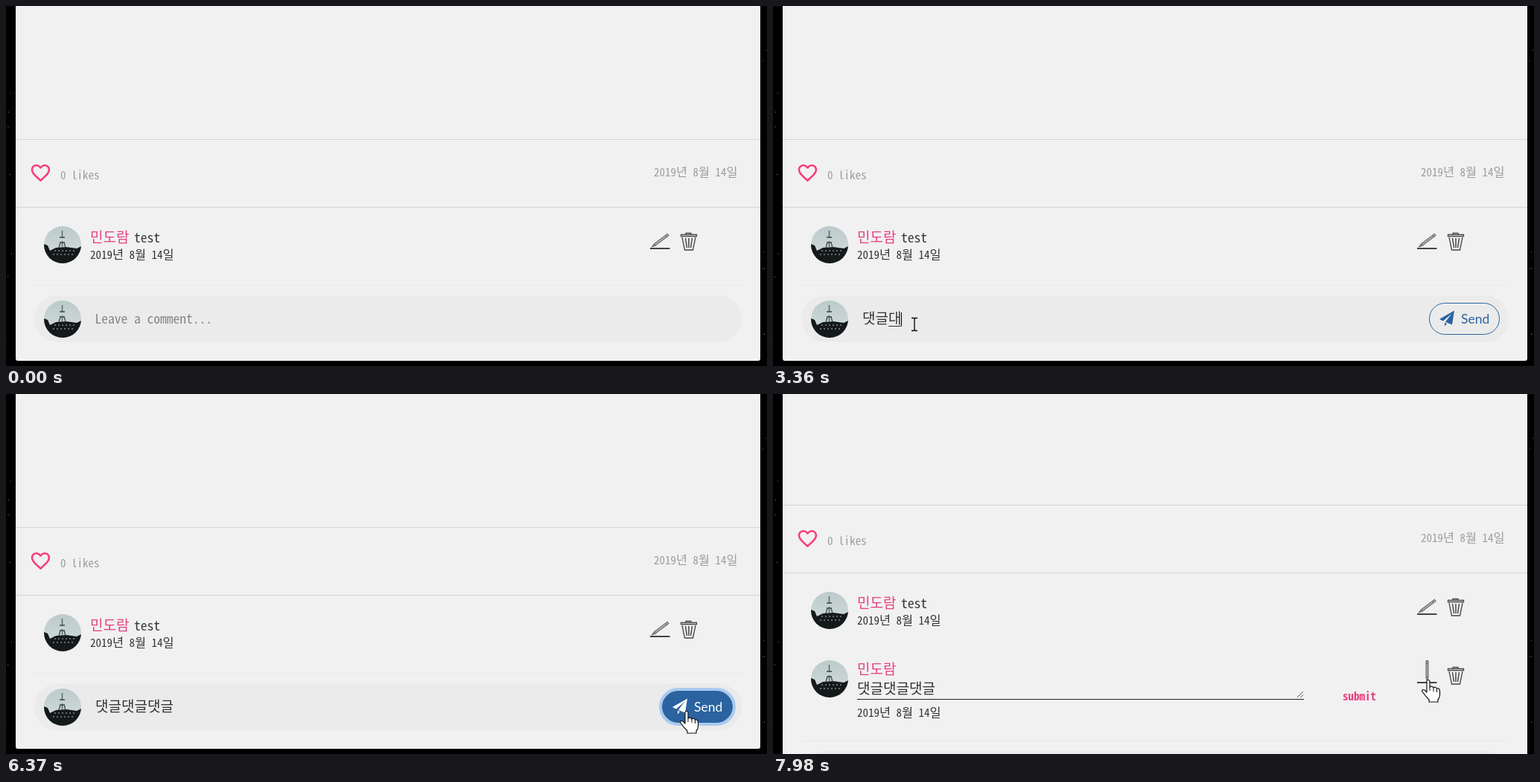
An HTML page for the animation above (8 s loop, 1022 by 484 pixels).

```html
<!DOCTYPE html>
<html lang="ko">
<head>
<meta charset="utf-8">
<title>Comments</title>
<style>
html, body { margin: 0; width: 100%; height: 100%; overflow: hidden; background: #000; }
svg { display: block; }
text { font: 17.5px "Noto Sans Mono CJK KR", "Noto Sans CJK KR", monospace; fill: #333; white-space: pre; }
text.small { font-size: 15px; }
text.gray { fill: #9c9c9c; }
text.hint { fill: #858585; }
text.pink { fill: #e6417f; font-weight: 700; }
/* Hangul is .92em wide, so it is set larger to fill two Latin cells. */
.han { font: 300 19px "Noto Sans CJK KR", "Noto Sans Mono CJK KR", sans-serif; }
.han.small { font-size: 16.3px; }
text.pink.han { font-weight: 500; }
#send text { font: 17.5px Lato, "Open Sans", sans-serif; }
.cursor path { stroke-linejoin: round; }
</style>
</head>
<body>
<svg width="1022" height="484" viewBox="0 0 1022 484">
  <defs>
    <clipPath id="round"><circle cx="25" cy="25" r="25"/></clipPath>
    <clipPath id="pillClip"><rect x="38" y="389" width="950" height="63" rx="31.5"/></clipPath>
    <linearGradient id="sky" x2="0" y2="1">
      <stop stop-color="#bccacb"/><stop offset="1" stop-color="#d6dedd"/>
    </linearGradient>
    <symbol id="avatar" width="50" height="50">
      <g clip-path="url(#round)">
        <rect width="50" height="50" fill="url(#sky)"/>
        <path d="M0 24L5 26L8 33L16 29L30 28L44 30L50 27V50H0Z" fill="#14191a"/>
        <path d="M24.500 6V16M24.500 20V29" stroke="#5a6667" stroke-width="1.500"/>
        <path d="M21 15H28M21 22H28M22 22L20 29M27 22L29 29" stroke="#39494b" stroke-width="1.300"/>
        <path d="M14 33H44M12 38H40" stroke="#7b8a8b" stroke-width="1.500" stroke-dasharray="2 3"/>
      </g>
    </symbol>
    <g id="trash" fill="none" stroke="#444" stroke-width="1.300">
      <path d="M913 307V305.500H920V307"/>
      <rect x="906.500" y="307.300" width="21" height="2.400" fill="#ccc"/>
      <path d="M908 311L911.500 328H922.500L926 311"/>
      <path d="M912.500 312L914.500 325M917 312V325M921.500 312L919.500 325" stroke-width="1.500"/>
    </g>
    <g id="pencil" stroke="#555" stroke-width=".9">
      <path d="M-1.500 -13.500H1.500V9L0 14L-1.500 9Z" fill="#aaa"/>
      <path d="M-1.500 -10H1.500M-1.500 9H1.500"/>
    </g>
  </defs>

  <g id="stars" fill="#fff"></g>
  <rect id="panel" x="13" y="-20" width="1000" rx="3" fill="#f1f1f1"/>

  <g id="page">
    <path d="M13 179.500H1013M13 270.500H1013" stroke="#d3d3d3"/>
    <path transform="translate(31.200 209.200) scale(1.270)" fill="#f53d80"
      d="M16.500 3c-1.740 0-3.410.810-4.500 2.090C10.910 3.810 9.240 3 7.500 3 4.420 3 2 5.420 2 8.500c0 3.780 3.400 6.860 8.550 11.540L12 21.350l1.450-1.320C18.600 15.360 22 12.280 22 8.500 22 5.420 19.580 3 16.500 3zm-4.400 15.550l-.1.1-.1-.1C7.140 14.240 4 11.390 4 8.500 4 6.500 5.500 5 7.500 5c1.540 0 3.040.990 3.570 2.360h1.870C13.460 5.990 14.960 5 16.500 5c2 0 3.500 1.500 3.500 3.500 0 2.890-3.140 5.740-7.900 10.050z"/>
    <text class="small gray" x="73" y="233">0 likes</text>
    <text id="postDate" class="small gray" x="870" y="229"></text>
    <g id="first"></g>
    <g id="second" transform="translate(0 92)"></g>
    <g id="foot">
      <path d="M38 375.500H988" stroke="#e8e8e8"/>
      <rect x="38" y="389" width="950" height="63" rx="31.500" fill="#ebebeb"/>
      <use href="#avatar" x="51" y="396"/>
      <text id="hint" class="hint" x="119.500" y="427">Leave a comment...</text>
      <text id="typed" class="han" x="120" y="427"></text>
      <path id="underline" stroke="#333"/>
      <path id="caret" stroke="#000"/>
      <g clip-path="url(#pillClip)">
        <g id="send">
          <rect id="ring" x="879" y="397" width="99" height="47" rx="23.500" fill="none" stroke="#a9cbf0" stroke-width="4"/>
          <rect id="button" x="881.500" y="399.500" width="94" height="42" rx="21" stroke="#2a639f"/>
          <g id="label">
            <path d="M915 409.500L895 421L900 423.400L911.500 413.500L903 424.800L912 428.500ZM902 425.800V430.500L905 427Z"/>
            <text x="924" y="427" style="fill:inherit">Send</text>
          </g>
        </g>
      </g>
    </g>
  </g>

  <g id="arrow" class="cursor">
    <path d="M0 0V26L6 20.500L10.500 30L14.500 28L10.300 18.800H18.700Z" fill="#fff" stroke="#111"/>
  </g>
  <g id="beam" class="cursor">
    <path d="M-4 -8.500H-1L0 -7.500L1 -8.500H4M-4 8.500H-1L0 7.500L1 8.500H4M0 -8V8" fill="none" stroke="#000" stroke-width="1.300"/>
  </g>
  <g id="hand" class="cursor">
    <path d="M-2 2Q0 -1.500 2 2V10Q5 8 7 11Q10 9 11.500 12Q15 11 15.500 15V21Q15 25 13 27V30H1V27Q-4 22 -8.500 15.500Q-8 12.500 -5 14L-2 17Z" fill="#fff" stroke="#111" stroke-width="1.200"/>
    <path d="M2 10V15M7 11V16M11.500 12V17" stroke="#111"/>
  </g>
</svg>
<script>
const LOOP = 8000, EM = 17.5;
const SENT = 6440, POSTED = 6510, EDIT = 7630;
const DATE = '2019년 8월 14일'.replace(/[가-힣]/g, '<tspan class="han small">$&</tspan>');
const $ = id => document.getElementById(id);
const set = (id, attrs) => { for (const k in attrs) $(id).setAttribute(k, attrs[k]); };
const show = (id, on) => $(id).setAttribute('visibility', on ? 'inherit' : 'hidden');
const clamp = v => Math.max(0, Math.min(1, v));
const ease = (t, start, length) => { const p = clamp((t - start) / length); return p * p * (3 - 2 * p); };

function comment(id, body, style, shift) {
  $(id).innerHTML = `
    <use id="${id}Face" href="#avatar" x="51" y="296"/>
    <text id="${id}Name" class="pink han" x="113" y="${318 - shift}">민도람</text>
    <text id="${id}Body" class="${style}" x="172" y="${318 - shift}">${body}</text>
    <text id="${id}Date" class="small" x="113" y="${340 - shift}">${DATE}</text>
    <path d="M865 326H891.5" stroke="#444" stroke-width="2"/>
    <use id="${id}Pencil" href="#pencil" transform="translate(878.5 315.5) rotate(53)"/>
    <use href="#trash"/>
    <g id="${id}Editor" visibility="hidden">
      <path d="M113 348.5H713" stroke="#222"/>
      <path d="M704 346L712 338M708.5 346L712 342.5" stroke="#555"/>
      <text class="small pink" x="765" y="350">submit</text>
    </g>`;
}
$('postDate').innerHTML = DATE;
comment('first', 'test', '', 0);
comment('second', '댓글댓글댓글', 'han', 1);

let seed = 7;
const rand = () => (seed = seed * 16807 % 2147483647) / 2147483647;
for (let i = 0; i < 14; i++) {
  const x = (i % 2 ? 1014 : 0) + rand() * 8, y = rand() * 484;
  $('stars').innerHTML += `<circle cx="${x}" cy="${y}" r=".8" opacity="${0.1 + rand() * 0.3}"/>`;
}

// Each key press extends or replaces the syllable being composed.
const stages = ['ㄷ', '대', '댓', 'ㄱ', '그', '글'];
const KEY_START = 2070, KEY_GAP = 165, KEYS = 18;
function typedText(t) {
  const n = Math.min(KEYS, Math.floor((t - KEY_START) / KEY_GAP) + 1);
  if (n <= 0 || t >= SENT) return '';
  const done = Math.floor((n - 1) / 3);
  return '댓글댓글댓글'.slice(0, done) + stages[(n - 1) % 6];
}

// Moves: start, end, then start point, control point and end point of a curve.
const moves = [
  [500, 1050, 125, 500, 155, 440, 190, 428],
  [5050, 6000, 190, 428, 230, 490, 914, 426],
  [6650, 7300, 914, 425, 915, 385, 880, 384]
];
function pointer(t) {
  const [a, b, x0, y0, x1, y1, x2, y2] = moves.filter(m => m[0] <= t).pop() || moves[0];
  const p = ease(t, a, b - a), q = 1 - p;
  const mix = (u, v, w) => q * q * u + 2 * p * q * v + p * p * w;
  return [mix(x0, x1, x2), mix(y0, y1, y2)];
}
const inside = (x, y, l, top, r, b) => x >= l && x <= r && y >= top && y <= b;

function draw(t) {
  const posted = t >= POSTED, editing = t >= EDIT;
  const [x, y] = pointer(t);
  const overSend = t < SENT && inside(x, y, 881, 399, 976, 442);
  const overInput = t < SENT && inside(x, y, 110, 395, 880, 446);
  const overIcon = posted && (inside(x, y, 865, 364, 892, 391) || inside(x, y, 906, 366, 928, 391));
  const kind = overSend || overIcon ? 'hand' : overInput ? 'beam' : 'arrow';
  for (const id of ['arrow', 'beam', 'hand']) {
    show(id, id === kind);
    set(id, { transform: `translate(${x} ${y})` });
  }

  set('panel', { height: posted ? 540 : 497 });
  set('page', { transform: `translate(0 ${posted ? -30 : 0})` });
  set('foot', { transform: `translate(0 ${(posted ? 91 : 0) + (editing ? 30 : 0)})` });

  show('second', posted);
  set('secondFace', { opacity: clamp((t - POSTED) / 140) });
  const lift = ease(t, 7200, 350);
  set('secondPencil', { transform: `translate(878.5 ${315.5 - 5.5 * lift}) rotate(${53 * (1 - lift)})` });
  show('secondEditor', editing);
  set('secondName', { y: editing ? 315 : 317 });
  set('secondBody', { x: editing ? 113 : 172, y: editing ? 341 : 317 });
  set('secondDate', { y: editing ? 372 : 339 });

  const text = typedText(t);
  $('typed').textContent = text;
  show('hint', !text);
  const end = 120 + text.length * EM;
  const composing = text && t < 6150;
  show('underline', composing);
  set('underline', { d: `M${end - EM} 430.5H${end}` });
  const typing = t >= KEY_START && t < KEY_START + KEYS * KEY_GAP;
  const blink = Math.floor((t - 1100) / 530) % 2 === 0;
  show('caret', t >= 1100 && t < 6150 && (typing || blink));
  const caretX = text ? Math.round(end) - 0.5 : 119.5;
  set('caret', { d: `M${caretX} 412V430` });

  const leave = ease(t, SENT, 245);
  const offset = 120 * (1 - ease(t, 2085, 400) + leave);
  const filled = overSend || t >= SENT;
  show('send', t >= 2085 && leave < 1);
  set('send', { transform: `translate(${offset} 0)`, opacity: 1 - 0.8 * leave });
  show('ring', t >= 6150);
  set('button', { fill: filled ? '#2a639f' : 'none' });
  set('label', { fill: filled ? '#fff' : '#2a639f', opacity: 1 - ease(t, SENT, 120) });
}

function tick() {
  draw(performance.now() % LOOP);
  requestAnimationFrame(tick);
}
tick();
</script>
</body>
</html>
```
